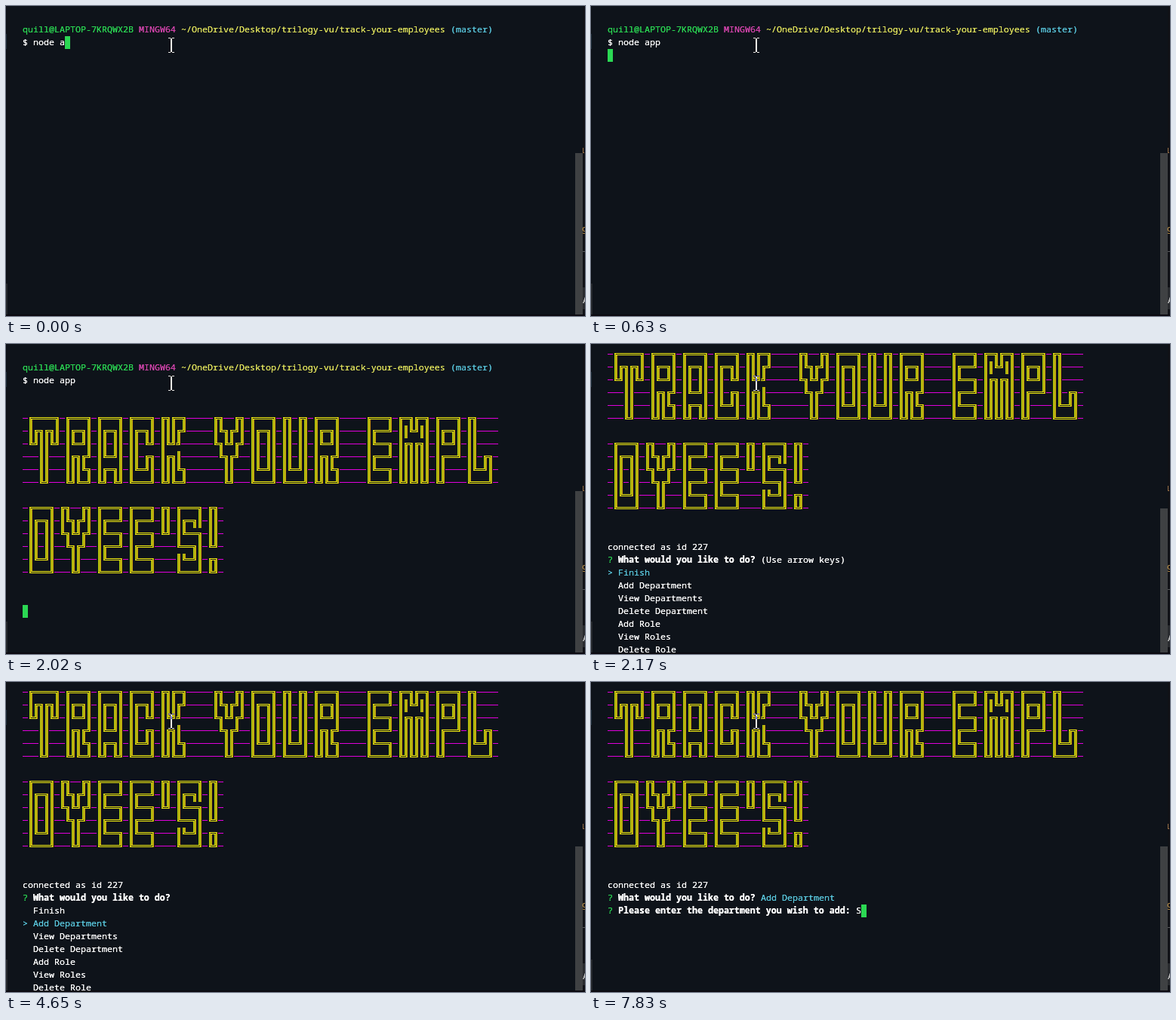
An HTML page with a canvas for the animation above (8 s loop, 767 by 411 pixels).

```html
<!DOCTYPE html>
<html lang="en">
<head>
<meta charset="utf-8">
<title>Terminal session</title>
<style>
  html, body { margin: 0; width: 100%; height: 100%; overflow: hidden; background: #0e131a; }
  canvas { display: block; }
</style>
</head>
<body>
<canvas id="stage" width="767" height="411"></canvas>
<script>
const ctx = document.getElementById('stage').getContext('2d');
const LOOP = 8000, LEFT = 22, TOP = 23, CELL_W = 7, CELL_H = 17;
const FONT = '11.667px "Noto Sans Mono", "DejaVu Sans Mono", monospace';
const C = {
  bg: '#0e131a', white: '#ffffff', green: '#2bd853', pink: '#d645ae', path: '#e2e45c',
  cyan: '#5ac8de', yellow: '#f4ee12', lime: '#a8dc0c', amber: '#c98a10',
  magenta: '#e000dc', thumb: '#3f4143'
};

// Banner lettering: six rows per letter, missing rows are filled with dashes.
const GLYPHS = {
  T: '╔════╗ ║╔╗╔╗║ ╚╝║║╚╝ ──║║── ──║║── ──╚╝──',
  R: '╔═══╗ ║╔═╗║ ║╚═╝║ ║╔╗╔╝ ║║║╚╗ ╚╝╚═╝',
  A: '╔═══╗ ║╔═╗║ ║║─║║ ║╚═╝║ ║╔═╗║ ╚╝─╚╝',
  C: '╔═══╗ ║╔═╗║ ║║─╚╝ ║║─╔╗ ║╚═╝║ ╚═══╝',
  K: '╔╗╔═╗ ║║║╔╝ ║╚╝╝─ ║╔╗║─ ║║║╚╗ ╚╝╚═╝',
  Y: '╔╗──╔╗ ║╚╗╔╝║ ╚╗╚╝╔╝ ─╚╗╔╝─ ──║║── ──╚╝──',
  O: '╔═══╗ ║╔═╗║ ║║─║║ ║║─║║ ║╚═╝║ ╚═══╝',
  U: '╔╗─╔╗ ║║─║║ ║║─║║ ║║─║║ ║╚═╝║ ╚═══╝',
  E: '╔═══╗ ║╔══╝ ║╚══╗ ║╔══╝ ║╚══╗ ╚═══╝',
  M: '╔═╗╔═╗ ║║╚╝║║ ║╔╗╔╗║ ║║║║║║ ║║║║║║ ╚╝╚╝╚╝',
  P: '╔═══╗ ║╔═╗║ ║╚═╝║ ║╔══╝ ║║─── ╚╝───',
  L: '╔╗─── ║║─── ║║─── ║║─╔╗ ║╚═╝║ ╚═══╝',
  S: '╔═══╗ ║╔═╗║ ║╚══╗ ╚══╗║ ║╚═╝║ ╚═══╝',
  "'": '╔╗ ║║ ╚╝',
  '!': '╔╗ ║║ ║║ ╚╝ ╔╗ ╚╝',
  ' ': '───'
};

function bannerRows(text) {
  const letters = [...text].map(ch => GLYPHS[ch].split(' '));
  return Array.from({ length: 6 }, (_, i) =>
    '─' + letters.map(rows => rows[i] || '─'.repeat(rows[0].length)).join('─') + '─');
}
const BANNER = [...bannerRows('TRACK YOUR EMPL'), '', ...bannerRows("OYEE'S!")];
const BANNER_ROW = 4;

const CHOICES = ['Finish', 'Add Department', 'View Departments', 'Delete Department',
  'Add Role', 'View Roles', 'Delete Role'];

const PROMPT = [['quill@LAPTOP-7KRQWX2B ', C.green], ['MINGW64 ', C.pink],
  ['~/OneDrive/Desktop/trilogy-vu/track-your-employees ', C.path], ['(master)', C.cyan]];
const plain = text => [[text, C.white]];
const question = (text, reply, color) =>
  [['? ', C.green], [text + ' ', C.white, true], [reply, color]];
const TODO = 'What would you like to do?';
const CONNECTED = plain('connected as id 227');

const typing = (text, row, col) => ({ lines: { 1: plain('$ ' + text) }, cursor: [row, col] });
const running = { lines: { 1: plain('$ node app') }, banner: true };

function menu(selected, hint) {
  const lines = { 19: CONNECTED, 20: question(TODO, hint, C.white) };
  CHOICES.forEach((name, i) => {
    lines[21 + i] = i === selected ? [['> ' + name, C.cyan]] : plain('  ' + name);
  });
  return { lines, banner: true, scroll: 5 };
}

function entry(value) {
  return {
    lines: {
      19: CONNECTED,
      20: question(TODO, 'Add Department', C.cyan),
      21: question('Please enter the department you wish to add:', value, C.white)
    },
    banner: true, scroll: 5, cursor: [21, 47 + value.length]
  };
}

const STEPS = [
  [0, typing('node a', 1, 8)],
  [380, typing('node ap', 1, 9)],
  [530, typing('node app', 1, 10)],
  [630, typing('node app', 2, 0)],
  [2020, { ...running, cursor: [19, 0] }],
  [2090, { ...running, lines: { ...running.lines, 19: CONNECTED }, cursor: [20, 0] }],
  [2170, menu(0, '(Use arrow keys)')],
  [4650, menu(1, '')],
  [5740, entry('')],
  [7830, entry('S')]
];

function rect(color, x, y, w, h) {
  ctx.fillStyle = color;
  ctx.fillRect(x, y, w, h);
}

// Two passes give the dense, bright strokes of a terminal font.
function print(text, color, x, baseline, weight = 500) {
  ctx.font = `${weight} ${FONT}`;
  ctx.fillStyle = color;
  ctx.fillText(text, x, baseline);
  ctx.fillText(text, x, baseline);
}

function drawLine(runs, row) {
  let x = LEFT;
  for (const [text, color, bold] of runs) {
    print(text, color, x, TOP + row * CELL_H + 12, bold ? 700 : 500);
    x += text.length * CELL_W;
  }
}

function drawBox(ch, col, row) {
  const x = LEFT + col * CELL_W, y = TOP + row * CELL_H;
  const xs = [2, 4], ys = [6, 8];
  const across = (from, to, at) => rect(C.yellow, x + from, y + at, to - from, 1);
  // Upright strokes carry a subpixel fringe on their right side.
  const down = (from, to, at) => {
    rect(C.lime, x + at, y + from, 1, to - from);
    rect(C.amber, x + at + 1, y + from, 1, to - from);
  };

  if (ch === '─') rect(C.magenta, x, y + 7, CELL_W, 1);
  else if (ch === '═') ys.forEach(at => across(0, CELL_W, at));
  else if (ch === '║') xs.forEach(at => down(0, CELL_H, at));
  else {
    const right = '╔╚'.includes(ch), below = '╔╗'.includes(ch);
    for (const i of [0, 1]) {
      const cx = xs[right ? i : 1 - i], cy = ys[below ? i : 1 - i];
      below ? down(cy, CELL_H, cx) : down(0, cy + 1, cx);
      right ? across(cx, CELL_W, cy) : across(0, cx + 1, cy);
    }
  }
}

function drawEdges(scrolled) {
  rect('#0a0e14', 0, 0, 1, 411);
  rect('#1b2a38', 0, 37, 1, 20);
  rect('#24272b', 0, 368, 2, 41);
  const top = scrolled ? 218 : 195;
  rect(C.thumb, 754, top, 10, 409 - top);
  rect('#101116', 764, 0, 3, 411);
  rect('#9a7146', 764, 188, 1, 7);
  rect('#9a7146', 764, 194, 2, 1);
  print('g', '#a88345', 763, 299);
  rect('#5a5b5d', 764, 325, 3, 1);
  rect('#292b2f', 764, 373, 3, 29);
  print('A', '#c4c4c4', 764, 394);
  rect('#0b0910', 0, 409, 767, 2);
}

function drawPointer() {
  ctx.globalCompositeOperation = 'difference';
  for (const y of [42, 61]) {
    rect('#fff', 215, y, 3, 1);
    rect('#fff', 220, y, 3, 1);
  }
  rect('#fff', 218, 43, 2, 18);
  ctx.globalCompositeOperation = 'source-over';
}

function draw({ lines, banner, cursor, scroll = 0 }) {
  rect(C.bg, 0, 0, 767, 411);
  drawLine(PROMPT, -scroll);
  for (const row in lines) drawLine(lines[row], row - scroll);
  if (banner) {
    BANNER.forEach((text, i) =>
      [...text].forEach((ch, col) => drawBox(ch, col, BANNER_ROW + i - scroll)));
  }
  if (cursor) {
    const [row, col] = cursor;
    rect(C.green, LEFT + col * CELL_W, TOP + (row - scroll) * CELL_H, CELL_W, CELL_H);
  }
  drawEdges(scroll > 0);
  drawPointer();
}

const start = performance.now();
function tick() {
  const time = (performance.now() - start) % LOOP;
  draw(STEPS.findLast(([at]) => at <= time)[1]);
  requestAnimationFrame(tick);
}
tick();
</script>
</body>
</html>
```
